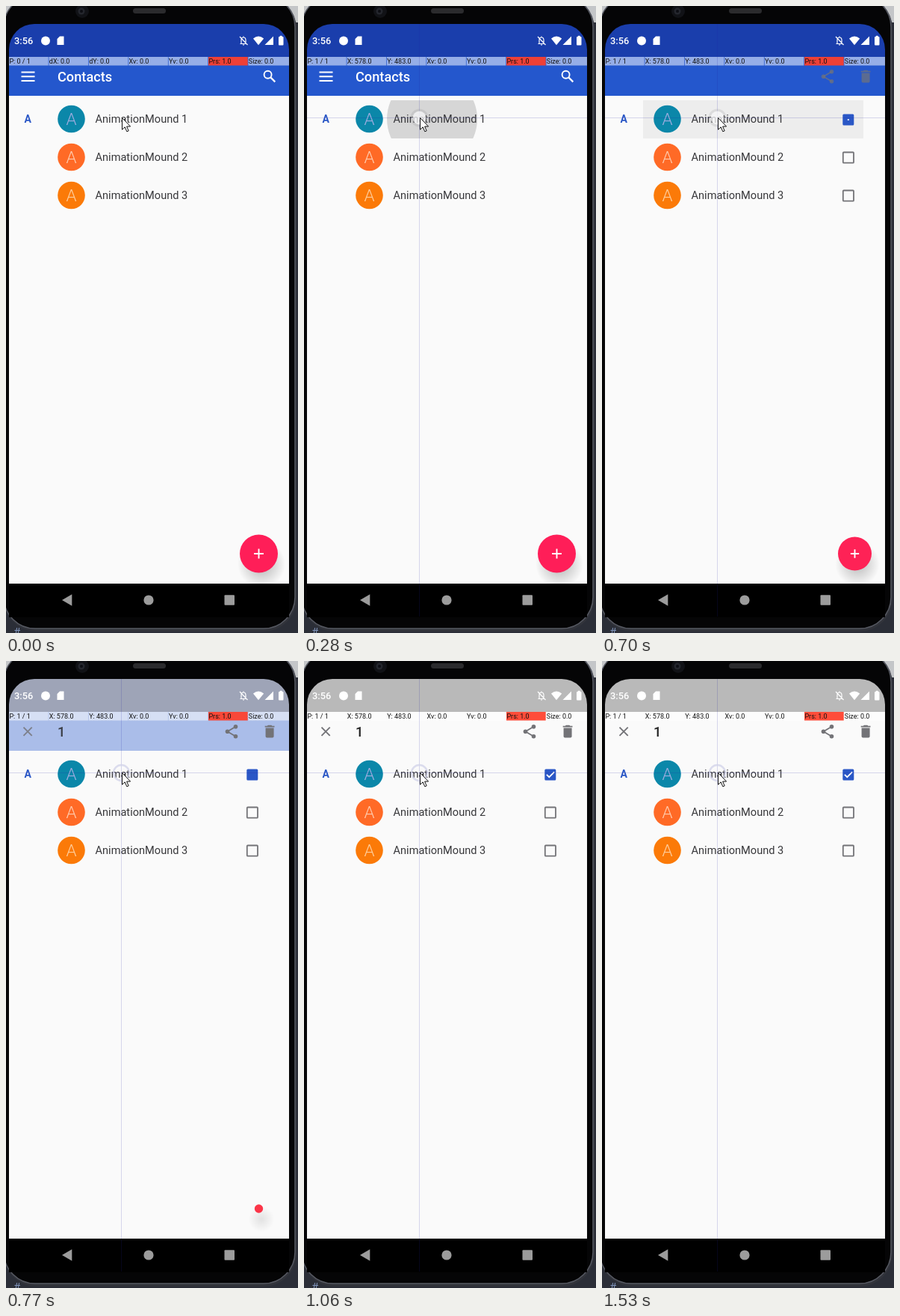
Animation of 391x838 px, one loop 1670 ms. Source, as an HTML page with a canvas:

```html
<!DOCTYPE html>
<html lang="en">
<head>
<meta charset="utf-8">
<title>Contact selection</title>
<style>
  html, body { margin: 0; width: 100%; height: 100%; overflow: hidden; background: #23262f; }
  canvas { display: block; }
</style>
</head>
<body>
<canvas id="stage" width="391" height="838"></canvas>
<script>
const ctx = document.getElementById('stage').getContext('2d');
const LOOP = 1670, STEP = 70;
const TOUCH = { x: 154.5, y: 149.5 };
const BLUE = '#2a57c6', GREY = '#737377', PAPER = '#fafafa';
const ROWS = [
  { y: 151, color: '#0b87a9', letter: '#a3aee2' },
  { y: 202, color: '#ff6a26', letter: '#ffcdb0' },
  { y: 253, color: '#fb7a08', letter: '#ffd0a0' }
];

const clamp = v => Math.max(0, Math.min(1, v));
const progress = (t, start, length) => clamp((t - start) / length);
const easeOut = (u, power) => 1 - (1 - u) ** power;
const mix = (a, b, p) => `rgb(${a.map((v, i) => Math.round(v + (b[i] - v) * p))})`;

function rect(x, y, w, h, color, radius = 0) {
  ctx.fillStyle = color;
  ctx.beginPath();
  ctx.roundRect(x, y, w, h, radius);
  ctx.fill();
}

function disc(x, y, r, color) {
  ctx.fillStyle = color;
  ctx.beginPath();
  ctx.arc(x, y, r, 0, Math.PI * 2);
  ctx.fill();
}

function ring(x, y, r, color, width) {
  ctx.strokeStyle = color;
  ctx.lineWidth = width;
  ctx.beginPath();
  ctx.arc(x, y, r, 0, Math.PI * 2);
  ctx.stroke();
}

function shape(d, color) {
  ctx.fillStyle = color;
  ctx.fill(new Path2D(d));
}

function line(d, color, width) {
  ctx.strokeStyle = color;
  ctx.lineWidth = width;
  ctx.stroke(new Path2D(d));
}

function text(str, x, y, size, color, weight = 400, align = 'left') {
  ctx.font = `${weight} ${size}px Roboto, sans-serif`;
  ctx.textAlign = align;
  ctx.fillStyle = color;
  ctx.fillText(str, x, y);
}

function drawPhone() {
  rect(0, 0, 391, 838, '#2b2e37');
  rect(0, 0, 391, 22, '#c4c6c8');
  text('#', 10, 842, 15, '#7f93b8');
  rect(-3, -14, 392, 850, '#32343b', 44);
  rect(-3, -14, 390, 846, '#050506', 42);
  ctx.strokeStyle = '#565962';
  ctx.lineWidth = 1.5;
  ctx.stroke();
  disc(102, 7, 9, '#111216');
  disc(101, 7, 4.5, '#24262d');
  disc(101, 7, 2, '#0c0d12');
  rect(170, 3, 44, 7, '#2b2b2d', 3.5);
}

function drawStatus(p) {
  rect(4, 24, 375, 45, mix([26, 62, 172], [185, 185, 185], p), [34, 34, 0, 0]);
  text('3:56', 11, 51, 12.8, '#fff', 500);
  disc(53, 46.5, 6, '#fff');
  shape('M72 40.5H77.5V52H68.5V44Z', '#fff');
  line('M313.5 50.5H322M315 50V45.5Q315 42 318 42T321 45.5V50M318 40.5V42M317 52H319M313 41L323.5 52', '#fff', 1.2);
  shape('M331 43.5Q338 37.5 345.2 43.5L338 52.2Z', '#fff');
  shape('M358 40.5V52H346.5Z', '#fff');
  rect(365, 41, 6.5, 11.5, '#fff', 1);
  rect(366.7, 39.8, 3, 2, '#fff');
}

function drawToolbar(t, fade, quickFade) {
  rect(4, 68, 375, 52, mix([36, 87, 205], [250, 250, 250], fade));
  if (t < 700) {
    line('M20.5 88.5H38.5M20.5 94.3H38.5M20.5 100H38.5', '#fff', 2);
    text('Contacts', 69, 101, 18.2, '#fff', 500);
    ring(350.6, 91.7, 5, '#fff', 1.9);
    line('M354.3 95.4L360.3 101.4', '#fff', 2.2);
    return;
  }
  ctx.globalAlpha = t < 770 ? 0.7 : 1;
  line('M296.5 94.3L307.5 87.8M296.5 94.3L307.5 100.7', GREY, 1.8);
  for (const [x, y] of [[296.5, 94.3], [307.5, 87.8], [307.5, 100.7]]) disc(x, y, 2.8, GREY);
  shape('M347.6 89.5H358.6V100.7Q358.6 102.5 356.8 102.5H349.4Q347.6 102.5 347.6 100.7Z', GREY);
  shape('M346.7 86.8H349.8L350.8 85.8H355.4L356.4 86.8H359.5V88.6H346.7Z', GREY);
  ctx.globalAlpha = quickFade;
  line('M23.5 88.7L34.7 99.9M34.7 88.7L23.5 99.9', GREY, 1.9);
  text('1', 69, 101, 18.2, '#222', 500);
  ctx.globalAlpha = 1;
}

function drawRipple(t) {
  const grow = progress(t, 200, 225);
  const alpha = 0.145 * progress(t, 200, 75) * clamp((732 - t) / 90);
  if (!alpha) return;
  ctx.save();
  ctx.beginPath();
  ctx.rect(55, 126, 295, 51);
  ctx.clip();
  disc(TOUCH.x + 48 * grow, 151, 10 + 142 * grow, `rgba(0,0,0,${alpha})`);
  ctx.restore();
}

function drawCheckbox(y, t, selected) {
  if (!selected) {
    ctx.strokeStyle = GREY;
    ctx.lineWidth = 1.8;
    ctx.beginPath();
    ctx.roundRect(322.8, y - 6.5, 14.2, 14.2, 1);
    ctx.stroke();
    return;
  }
  rect(322.3, y - 6.6, 15, 15, BLUE, 1.5);
  if (t < 770) rect(328.8, y, 2, 2, '#dce4f8');
  // The tick grows from its corner in both directions.
  const k = progress(t, 770, 120);
  if (k) line(`M${328.3 - 3.4 * k} ${y + 4.2 - 3.4 * k}L328.3 ${y + 4.2}L${328.3 + 6.8 * k} ${y + 4.2 - 6.8 * k}`, '#fff', 1.8);
}

function drawList(t) {
  rect(4, 120, 375, 652, PAPER);
  drawRipple(t);
  text('A', 29.2, 155.5, 14, BLUE, 700, 'center');
  ROWS.forEach(({ y, color, letter }, i) => {
    disc(87.5, y, 18.3, color);
    text('A', 87.5, y + 8, 22.5, letter, 300, 'center');
    text(`AnimationMound ${i + 1}`, 119.5, y + 4.7, 14.6, '#38383b');
    if (t >= 700) drawCheckbox(y, t, i === 0);
  });
}

function drawButton(t) {
  const r = Math.min(25.5, 25.5 - 0.24 * (t - 687.5));
  if (r <= 0) return;
  const scale = r / 25.5;
  ctx.save();
  ctx.beginPath();
  ctx.rect(4, 120, 375, 652);
  ctx.clip();
  const shadow = ctx.createRadialGradient(342, 746, 8 * scale, 342, 746, 13 + 19 * scale);
  shadow.addColorStop(0, `rgba(0,0,0,${0.05 + 0.17 * scale})`);
  shadow.addColorStop(1, 'rgba(0,0,0,0)');
  disc(342, 746, 33, shadow);
  disc(338.5, 732, r, mix([250, 60, 68], [255, 30, 88], scale));
  ctx.restore();
  if (scale > 0.4) {
    const arm = 6.4 * scale;
    line(`M${338.5 - arm} 732H${338.5 + arm}M338.5 ${732 - arm}V${732 + arm}`, '#fff', 1.9);
  }
}

function drawNavigation() {
  rect(4, 772, 375, 45, '#000');
  shape('M75 794L88.3 786.3V801.7Z', '#9c9c9c');
  disc(191, 794, 6.6, '#9c9c9c');
  rect(292.5, 787.3, 13.5, 13.5, '#9c9c9c', 1);
}

function drawTouch(t, down) {
  const labels = [
    down ? 'P: 1 / 1' : 'P: 0 / 1',
    down ? 'X: 578.0' : 'dX: 0.0',
    down ? 'Y: 483.0' : 'dY: 0.0',
    'Xv: 0.0', 'Yv: 0.0', 'Prs: 1.0', 'Size: 0.0'
  ];
  labels.forEach((label, i) => {
    const x = 4 + i * 53.4;
    rect(x, 68, i < 6 ? 52.7 : 54.6, 11.5, i === 5 ? 'rgba(255,62,42,.92)' : 'rgba(255,255,255,.52)');
    text(label, x + 0.4, 77, 9, '#111');
  });
  if (!down) return;
  line(`M4 ${TOUCH.y}H379M${TOUCH.x} 24V816`, 'rgba(30,30,160,.17)', 1);
  if (t >= 280 && t < 770) {
    disc(TOUCH.x, TOUCH.y, 12, 'rgba(110,110,120,.14)');
    disc(TOUCH.x, TOUCH.y, 9, 'rgba(255,255,255,.7)');
  } else {
    ring(TOUCH.x, TOUCH.y, 10.5, 'rgba(208,209,232,.75)', 2.4);
  }
}

function drawCursor() {
  const arrow = 'M155.5 149.5V165.2L159.2 161.8L161.8 167.8L164.2 166.8L161.6 161H166.6Z';
  shape(arrow, '#fff');
  line(arrow, '#111', 1);
}

function draw(t) {
  const u = progress(t, 700, 180);
  const fade = easeOut(u, 2), quickFade = easeOut(u, 3.6);
  drawPhone();
  drawStatus(quickFade);
  drawToolbar(t, fade, quickFade);
  drawList(t);
  drawButton(t);
  drawNavigation();
  drawTouch(t, t >= 70);
  drawCursor();
}

function tick(now) {
  draw(Math.floor((now % LOOP) / STEP) * STEP);
  requestAnimationFrame(tick);
}
requestAnimationFrame(tick);
</script>
</body>
</html>
```
